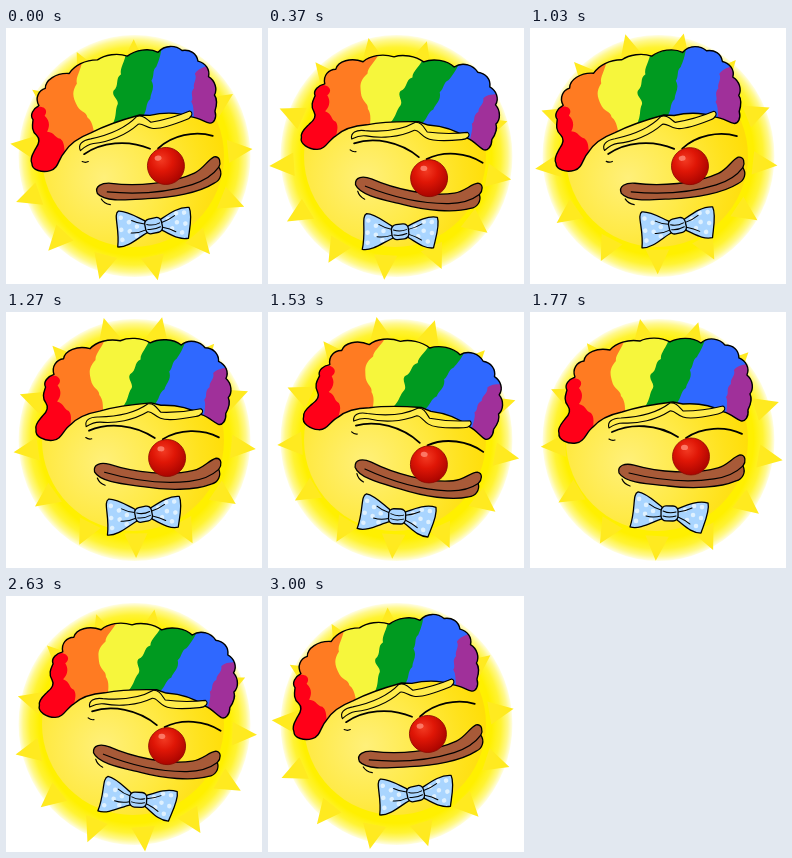
Recreate the animation shown at these times as an HTML page. Size 256x256 px, loop 3030 ms.

```html
<!DOCTYPE html>
<html lang="en">
<head>
<meta charset="utf-8">
<title>Dancing clown</title>
<style>
  html, body { margin: 0; width: 100%; height: 100%; overflow: hidden; background: #fff; }
  svg { display: block; width: 100vw; height: 100vh; }
  .ink { fill: none; stroke: #000; stroke-width: 1.4; stroke-linecap: round; stroke-linejoin: round; }
  .skin { fill: #ffec4c; stroke: #000; stroke-width: 1.1; stroke-linejoin: round; }
</style>
</head>
<body>
<svg viewBox="0 0 256 256">
  <defs>
    <radialGradient id="glow">
      <stop offset="0.82" stop-color="#fff000"/>
      <stop offset="0.9" stop-color="#fff000" stop-opacity="0.8"/>
      <stop offset="0.96" stop-color="#fff000" stop-opacity="0.45"/>
      <stop offset="1" stop-color="#fff000" stop-opacity="0.1"/>
    </radialGradient>
    <radialGradient id="face" gradientUnits="userSpaceOnUse" cx="98" cy="150" r="122">
      <stop offset="0" stop-color="#fff07a"/>
      <stop offset="0.45" stop-color="#ffea48"/>
      <stop offset="0.8" stop-color="#ffe21c"/>
      <stop offset="1" stop-color="#ffde08"/>
    </radialGradient>
    <radialGradient id="nose" cx="0.4" cy="0.32" r="0.68">
      <stop offset="0" stop-color="#f33a22"/>
      <stop offset="0.45" stop-color="#df1606"/>
      <stop offset="1" stop-color="#ac0500"/>
    </radialGradient>
    <path id="hair" d="M46 131C38 132 28 128 29 121C27 116 32 111 35 107C39 103 41 98 38 94C33 88 36 82 37 78C34 73 39 67 45 65C42 57 47 50 54 49C55 41 67 35 80 38C86 31 98 27 110 29C118 25 131 25 140 30C149 25 163 25 171 31C179 24 190 27 195 33C203 33 209 38 209 46C216 49 220 56 217 63C223 68 224 77 220 82C223 88 220 94 218 98C219 105 215 110 211 109C206 107 201 102 194 100C181 93 167 91 153 92L143 90C125 92 107 95 92 100C78 103 68 109 63 115C56 120 55 130 46 131Z"/>
    <clipPath id="hairClip"><use href="#hair"/></clipPath>
    <path id="wings" d="M132 195C124 189 116 181 108 180C102 182 106 197 100 215C110 218 122 210 132 207ZM147 197C157 193 168 188 178 191C180 199 174 212 171 221C161 221 154 213 147 208Z"/>
    <clipPath id="bowClip"><use href="#wings"/></clipPath>
  </defs>

  <ellipse cx="128.500" cy="128" rx="116" ry="121" fill="url(#glow)"/>
  <path id="rays" fill="#ffea20"/>
  <circle cx="127" cy="128" r="91" fill="url(#face)"/>

  <g id="head">
    <g clip-path="url(#hairClip)" id="stripes"></g>
    <use href="#hair" class="ink"/>

    <path class="skin" d="M79 116C77 110 82 106 91 106C111 105 127 101 140 91C146 90 149 95 153 99C166 99 181 97 193 94C197 96 194 101 188 102C175 105 161 108 153 105C147 103 144 98 140 99C126 108 108 112 93 111C86 111 82 114 79 116Z"/>
    <path class="ink" d="M82 120C101 111 127 112 148 125M156 126C172 115 195 114 212 122" style="stroke-width:1.8"/>
    <path class="ink" d="M79 127Q82 129 85 128M92 167Q94 172 100 174" style="stroke-width:1.2"/>

    <path d="M89 161C87 153 95 151 104 153C128 160 164 163 188 156C198 153 203 145 210 143C216 143 216 150 213 154C216 160 213 167 206 169C190 176 162 177 138 174C118 172 95 171 89 161Z" fill="#a85a38" stroke="#000" stroke-width="1.3"/>
    <path class="ink" d="M99 161C127 168 157 171 184 167C198 165 207 160 213 154" style="stroke-width:1.2"/>

    <circle cx="161" cy="144.500" r="18.500" fill="url(#nose)" stroke="#8e0800" stroke-width="0.8"/>
    <ellipse cx="154.500" cy="135.500" rx="3.500" ry="2.600" fill="#ff8a78" opacity="0.8"/>

    <g id="bow">
      <use href="#wings" fill="#a9d5ff"/>
      <g id="dots" clip-path="url(#bowClip)" fill="#dff1ff"></g>
      <use href="#wings" class="ink" style="stroke-width:1.3"/>
      <path class="ink" d="M131 198Q124 196 119 192M131 204Q123 206 116 204M148 200Q156 199 162 196M148 205Q155 208 160 212" style="stroke-width:1"/>
      <rect x="131" y="194" width="17" height="15" rx="5" fill="#a9d5ff" stroke="#000" stroke-width="1.3"/>
      <path class="ink" d="M133 199Q139 202 146 200M133 204Q139 206 146 204" style="stroke-width:1"/>
    </g>
  </g>
</svg>
<script>
const NS = 'http://www.w3.org/2000/svg';
const byId = id => document.getElementById(id);

function add(parent, tag, attrs) {
  const el = document.createElementNS(NS, tag);
  for (const key in attrs) el.setAttribute(key, attrs[key]);
  byId(parent).append(el);
}

// Each stripe covers everything right of its wavy left edge.
const stripes = [
  ['#ff0018', 'M0 0V256'],
  ['#ff7b22', 'M36 20L42 66C52 66 53 72 49 76C54 82 52 88 49 92C57 94 55 99 61 101C66 107 62 112 62 140'],
  ['#f6f63c', 'M97 20C94 36 85 42 86 49C78 58 81 64 82 69C84 78 91 78 91 84C97 91 95 98 95 140'],
  ['#009a20', 'M141 20C139 34 130 40 131 47C124 50 128 58 121 62C118 67 125 71 123 76C119 82 121 86 115 95L112 140'],
  ['#2f68ff', 'M177 20C174 34 170 40 167 45C162 48 164 54 160 58C163 66 157 70 156 76C150 80 152 86 146 92L140 140'],
  ['#a0309a', 'M228 46C217 55 210 51 204 58C206 64 200 67 201 72C195 77 200 81 196 85C199 91 195 96 195 140']
];
for (const [fill, edge] of stripes) add('stripes', 'path', { d: edge + 'H256V0Z', fill });

const dots = [[109, 187], [116, 193], [107, 199], [115, 202], [106, 209], [123, 199], [121, 208],
              [155, 198], [164, 194], [172, 195], [163, 203], [171, 206], [157, 208], [166, 214]];
for (const [cx, cy] of dots) add('dots', 'circle', { cx, cy, r: 2.3 });

const RAYS = 13, FRAMES = 91, LOOP = 3030, TURN = 2 * Math.PI;
const polar = (r, a) => `${(r * Math.cos(a)).toFixed(2)} ${(r * Math.sin(a)).toFixed(2)}`;
let burst = '';
for (let i = 0; i < RAYS; i++) {
  const a = (22 / 360 + i / RAYS) * TURN;
  burst += `M${polar(98, a - 0.12)}L${polar(122, a)}L${polar(98, a + 0.12)}Z`;
}
byId('rays').setAttribute('d', burst);

function draw(ms) {
  // 30 steps a second, on a 10 ms clock
  const step = Math.floor((3 * Math.floor(ms / 10) + 1) / 10);
  const spin = step / FRAMES * 360;
  const beat = step / 30;
  const tilt = 1 - 10 * Math.cos(beat * TURN);
  // The bow tie swings an eighth of a beat behind the head.
  const bowTilt = -5.5 - 9 * Math.cos((beat - 0.125) * TURN);
  // The burst sits slightly off its pivot, so it wobbles as it turns.
  byId('rays').setAttribute('transform', `translate(128 129) rotate(${spin}) translate(-2.9 4.1)`);
  byId('head').setAttribute('transform', `rotate(${tilt} 119 148)`);
  byId('bow').setAttribute('transform', `rotate(${bowTilt - tilt} 139.5 201.5)`);
}

const start = performance.now();
function tick() {
  draw((performance.now() - start) % LOOP);
  requestAnimationFrame(tick);
}
tick();
</script>
</body>
</html>
```
